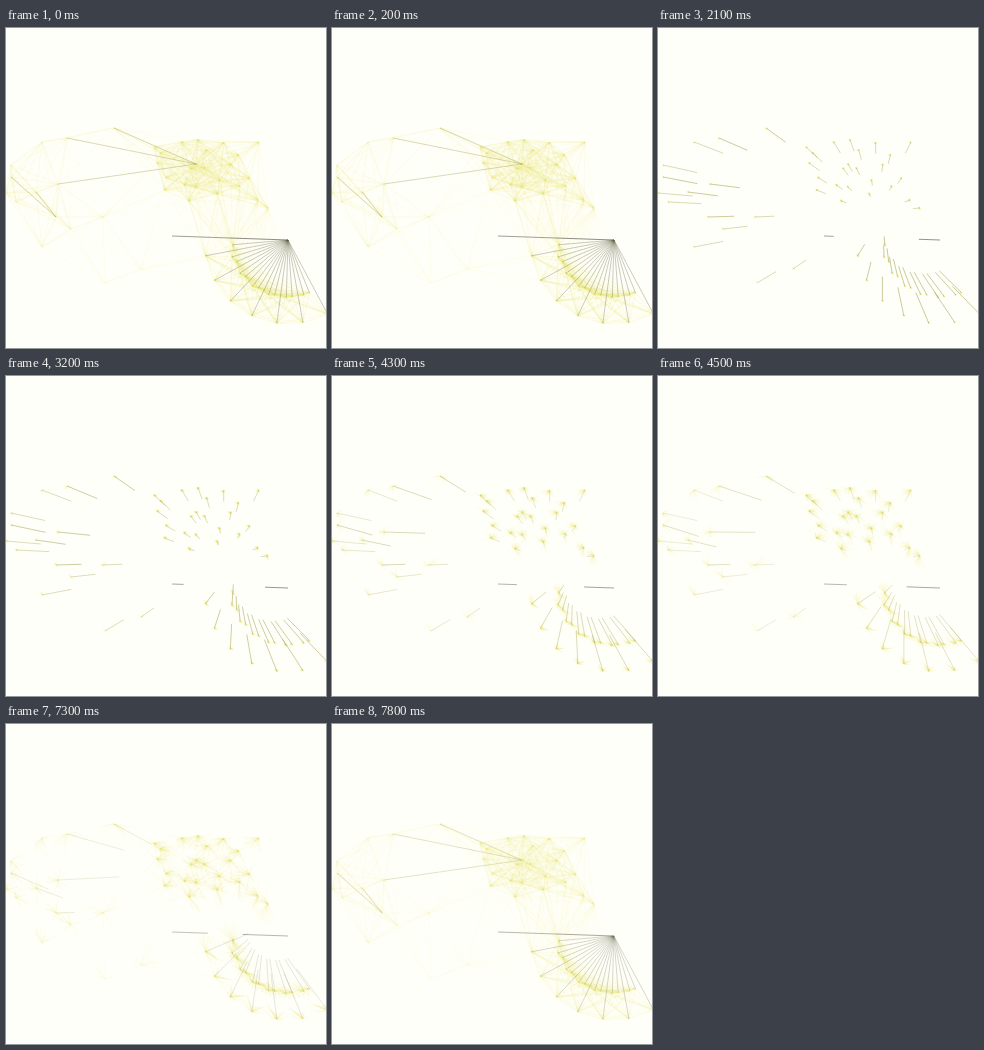
Recreate the animation shown at these times as an HTML page with a canvas. Size 320 by 320 pixels, loop 8 s.

```html
<!DOCTYPE html>
<html lang="en">
<head>
<meta charset="utf-8">
<title>Gathering lines</title>
<style>
  html, body { margin: 0; width: 100%; height: 100%; overflow: hidden; background: #fffffa; }
  canvas { display: block; width: 100vw; height: 100vh; }
</style>
</head>
<body>
<canvas id="stage" width="320" height="320"></canvas>
<script>
const ctx = document.getElementById('stage').getContext('2d');
const LOOP = 8000, STEP = 100, REACH = 95;
const centre = [218, 184];
const left = [50, 189], upper = [190, 136], right = [282, 212], bar = [166, 208];

let seed = 7;
const random = () => (seed = seed * 16807 % 2147483647) / 2147483647;
const clamp = x => Math.max(0, Math.min(1, x));
const ramp = (t, a, b) => clamp((t - a) / (b - a));
const mix = (p, q, f) => p.map((v, i) => v + (q[i] - v) * f);
const distance = (p, q) => Math.hypot(p[0] - q[0], p[1] - q[1]);

const nodes = [];
function add(p, hub, stub = .16) {
  nodes.push({ p, hub, stub: mix(p, centre, stub) });
}

// long rays with a hub to gather at
for (const p of [[5, 149], [30, 164], left]) add(p, left);
for (const p of [[61, 110], [108, 100], [52, 156]]) add(p, upper);

// outer points that only join the web
for (const p of [[36, 114], [0, 165], [10, 174], [5, 137], [36, 219], [65, 201], [97, 189],
  [99, 255], [135, 241], [148, 119], [183, 173], [253, 114], [252, 172], [262, 180], upper]) add(p);

// upper cloud
for (let i = 0; i < 18; i++) {
  const a = i * 2.4, r = Math.sqrt(random());
  add([198 + 56 * r * Math.cos(a), 140 + 34 * r * Math.sin(a)]);
}

// lower fan
for (let i = 0; i < 20; i++) {
  const a = 1.08 + i * .104, r = 66 + 18 * Math.cos(i * 2.1);
  add([right[0] + r * Math.cos(a), right[1] + r * Math.sin(a)], right, .26);
}

const web = [];
nodes.forEach((a, i) => nodes.slice(0, i).forEach(b => {
  const d = distance(a.p, b.p);
  if (d < REACH) web.push({ a: a.p, b: b.p, alpha: .17 * (1 - d / (REACH * 1.2)) });
}));

function pullAt(t) {
  if (t < 700) return 1;
  return .005 * ramp(t, 1000, 1100) + .025 * ramp(t, 1800, 2100) + .04 * ramp(t, 3100, 3300)
    + .14 * ramp(t, 4000, 4700) + .04 * ramp(t, 5000, 5800) + .74 * ramp(t, 7100, 7800) ** 2;
}

function line(p, q, rgb, alpha) {
  ctx.strokeStyle = `rgba(${rgb},${alpha})`;
  ctx.beginPath();
  ctx.moveTo(...p);
  ctx.lineTo(...q);
  ctx.stroke();
}

function draw(t) {
  const pull = pullAt(t);
  const start = clamp(1 - pull * 4), finish = clamp((pull - .25) / .75);
  const fade = t < 700 ? 1 : 1 - .25 * finish;
  ctx.fillStyle = '#fffffa';
  ctx.fillRect(0, 0, 320, 320);

  // each strand of the web grows from both its ends
  ctx.lineWidth = 1.3;
  for (const { a, b, alpha } of web) {
    const f = pull / (1 + pull);
    line(a, mix(a, b, f), '228,224,85', alpha * fade);
    line(b, mix(b, a, f), '228,224,85', alpha * fade);
  }

  ctx.lineWidth = 1;
  for (const { p, stub, hub } of nodes) {
    const end = hub ? mix(stub, hub, pull) : stub;
    const rgb = hub === right && finish ? '105,105,75' : '150,147,55';
    const alpha = hub ? .15 + .38 * start + .2 * finish : .08 + .3 * start;
    if (hub || !finish) line(p, end, rgb, alpha * fade);
  }

  const dark = (.35 + .2 * start + .2 * finish) * fade;
  line(bar, mix(bar, right, Math.min(.5, .06 + .8 * pull)), '85,85,70', dark);
  line(right, mix(right, bar, Math.min(.5, .16 + .75 * pull)), '50,50,45', dark);
}

function tick(now) {
  draw(Math.floor((now % LOOP) / STEP) * STEP);
  requestAnimationFrame(tick);
}
draw(0);
requestAnimationFrame(tick);
</script>
</body>
</html>
```
